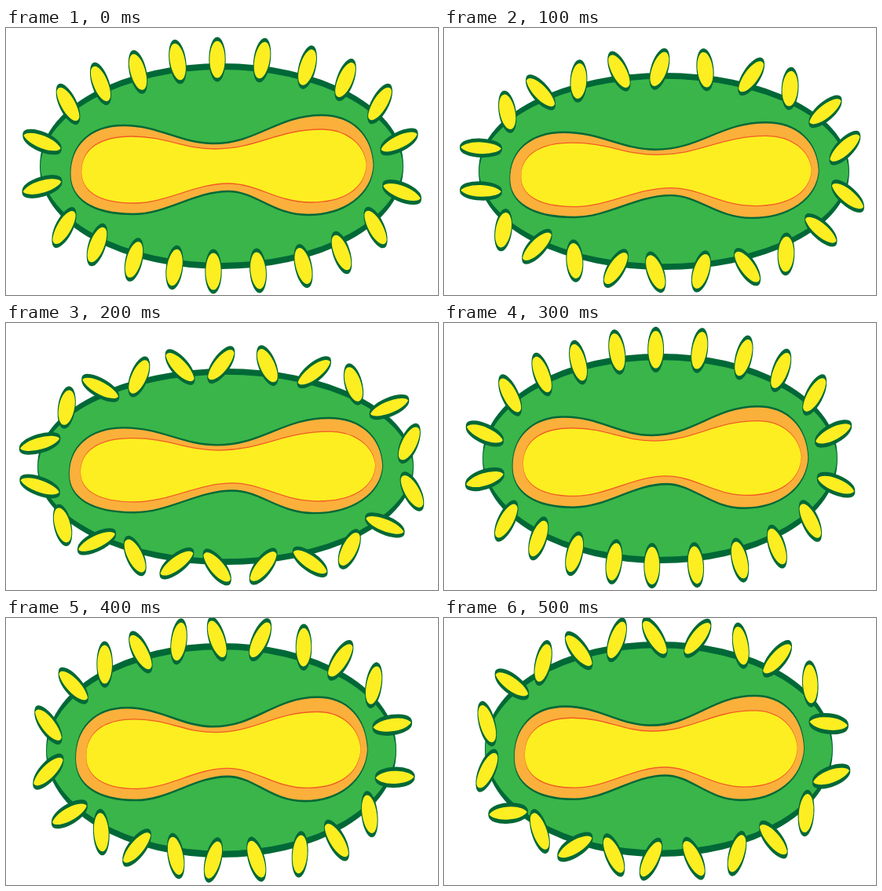
These frames come from a looping animation (550 by 340 pixels, 600 ms). An HTML page with a canvas:

```html
<!DOCTYPE html>
<html lang="en">
<head>
<meta charset="utf-8">
<title>Wobbling cell</title>
<style>
  html, body { margin: 0; width: 100%; height: 100%; overflow: hidden; background: #fff; }
  canvas { display: block; }
</style>
</head>
<body>
<canvas id="stage" width="550" height="340"></canvas>
<script>
const ctx = document.getElementById('stage').getContext('2d');
const DARK = '#006837', GREEN = '#39b54a', YELLOW = '#fcee21', ORANGE = '#fbb03b', RED = '#f15a24';
const STEP = 100;

// Body bounds (left, right, top, bottom) and spike swing (first way, second way)
const poses = [
  [43, 506, 45, 307, 0, 0],
  [44, 516, 57, 308, .5, 0],
  [40, 519, 58, 308, 1, 0],
  [49, 501, 39, 306, 0, 0],
  [51, 497, 32, 305, 0, .58],
  [52, 495, 30, 304, 0, 1]
];

// x, y, rest angle, first swing, second swing (degrees)
const spikes = [
  [46, 145, -67, -41, 50], [79, 97, -27, 35, -29], [120.5, 71, -20, -38, 34],
  [168, 56, -14, 34, -25], [218.5, 43, -9, -29, 29], [269, 40, 0, 33, -33],
  [326, 41, 9, -29, 29], [383.5, 50, 15, 33, -25], [432, 66, 21, -35, 22],
  [476, 96.5, 29, 36, -32], [500.5, 145, 63, -41, 33], [504, 209, -68, 43, -41],
  [470.5, 254, -26, -39, 31], [427, 286, -19, 41, -22], [378.5, 303, -13, -38, 30],
  [321, 309, -5, 39, -22], [264, 310, 0, -35, 27], [214.5, 305, 8, 41, -33],
  [163, 295, 14, -36, 46], [116, 276, 19, 42, -39], [74, 254, 28, -40, 58],
  [46, 202, 73, 39, -47]
];

const body = oval(274.5, 176, 231, 127, 0);
const shell = new Path2D(`M82 186C82 150 106 124 150 124C195 124 222 147 264 147
  C320 147 345 111 402 111C440 111 466 135 468 175C466 213 430 238 384 238
  C340 238 318 208 283 208C240 208 205 237 162 237C110 237 82 218 82 186Z`);
const core = new Path2D(`M96 183C96 155 118 138 160 138C205 138 225 154 266 154
  C320 154 345 129 402 129C432 129 456 146 459 174C457 205 430 222 388 222
  C345 222 320 198 283 198C240 198 205 223 163 223C115 223 96 206 96 183Z`);

function oval(x, y, rx, ry, degrees) {
  const path = new Path2D();
  path.ellipse(x, y, rx, ry, degrees * Math.PI / 180, 0, 2 * Math.PI);
  return path;
}

// Fill, then outline with a flat pen of the given width and height
function ink(path, fill, line, penW, penH) {
  ctx.fillStyle = fill;
  ctx.fill(path);
  const outline = new Path2D();
  outline.addPath(path, new DOMMatrix().scale(1 / penW, 1 / penH));
  ctx.save();
  ctx.scale(penW, penH);
  ctx.strokeStyle = line;
  ctx.lineWidth = 1;
  ctx.stroke(outline);
  ctx.restore();
}

function draw([left, right, top, bottom, a, b]) {
  const sx = (right - left) / 463, sy = (bottom - top) / 262;
  ctx.setTransform(1, 0, 0, 1, 0, 0);
  ctx.clearRect(0, 0, 550, 340);
  ctx.setTransform(sx, 0, 0, sy, left - 43 * sx, top - 45 * sy);
  ink(body, GREEN, DARK, 1, 8);
  ink(shell, ORANGE, DARK, 1, 2.5);
  ink(core, YELLOW, RED, .4, 1.3);
  for (const [x, y, rest, first, second] of spikes)
    ink(oval(x, y, 10.2, 26, rest + first * a + second * b), YELLOW, DARK, 1, 5);
}

function tick() {
  draw(poses[Math.floor(performance.now() / STEP) % poses.length]);
  requestAnimationFrame(tick);
}
tick();
</script>
</body>
</html>
```
